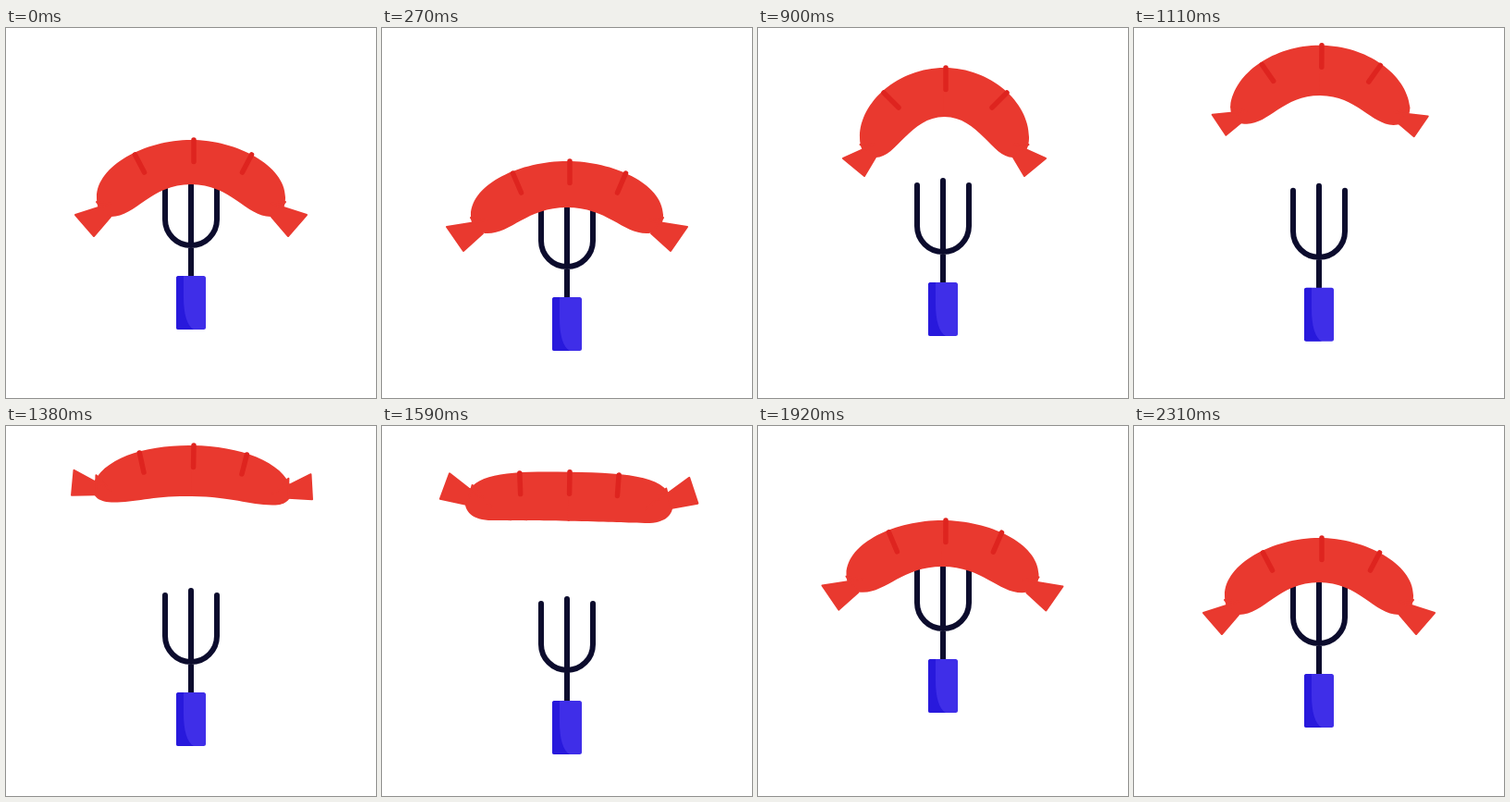
Animation of 400 by 400 pixels, one loop 4340 ms. Source, as an HTML page with a canvas:

```html
<!DOCTYPE html>
<html lang="en">
<head>
<meta charset="utf-8">
<title>Sausage toss</title>
<style>
html, body { margin: 0; height: 100%; overflow: hidden; background: #fff; }
canvas { display: block; }
</style>
</head>
<body>
<canvas id="stage" width="400" height="400"></canvas>
<script>
const ctx = document.getElementById('stage').getContext('2d');
const LOOP = 4340, STEP = 30, END = 2310;

// Half outlines measured from the top centre:
// top handle x, shoulder handle, shoulder, lobe, belly y,
// end piece (4 corners), side tick (2 points)
const rest = [50, 102, 28, 102, 62, 86, 83, 48,
  125, 81, 105, 104, 87, 83, 102, 67, 63, 16, 53, 35];
const wide = [50, 103, 24, 104, 58, 86, 78, 50,
  130, 71, 112, 97, 91, 78, 104, 61, 61, 13, 52, 34];
const bent = [50, 91.5, 37, 91.5, 75, 74, 97, 53,
  109.5, 98, 86.5, 117, 74, 96, 91, 83, 66.5, 27, 50.5, 43];
const flat = [50, 98, 15, 108, 46, 87, 63, 55,
  128, 29, 130, 56, 104, 55, 104, 34, 58, 9, 53, 30];
const straight = [80, 112, -2, 114, 28, 80, 51, 52,
  130, -4.5, 142, 23, 112, 31, 105, 10, 52, 0, 52, 23];

const poseKeys = [[0, rest], [270, wide], [570, rest], [630, rest], [900, bent],
  [1380, flat], [1740, straight], [1815, flat], [1920, wide], [END, rest]];
const forkKeys = [[0, 0], [570, 50], [600, 50], [750, 0], [900, 7], [1380, 20],
  [1620, 30], [1655, 31], [1740, 27], [1800, 6], [1920, -16], [END, 0]];
const topKeys = [[0, 121], [570, 171], [600, 171], [750, 121], [900, 43], [1080, 20],
  [1200, 17], [1380, 21], [1620, 56], [1740, 105], [1800, 118], [1920, 102], [END, 121]];
const midKeys = [[0, 200], [750, 200], [900, 201.5], [1380, 202], [1740, 203],
  [1920, 199.7], [END, 200]];
const tiltKeys = [[0, 0], [900, 0], [1380, 1], [1740, 1], [1920, 0.2], [END, 0]];

// Monotone cubic through the keys, at rest at every turning point
function ease(keys, t) {
  const last = keys.length - 1;
  if (t >= keys[last][0]) return keys[last][1];
  const rate = i => (keys[i + 1][1] - keys[i][1]) / (keys[i + 1][0] - keys[i][0]);
  const slope = i => {
    if (i === 0 || i === last) return 0;
    const a = rate(i - 1), b = rate(i);
    return a * b > 0 ? 2 * a * b / (a + b) : 0;
  };
  let i = 0;
  while (t >= keys[i + 1][0]) i++;
  const [t0, v0] = keys[i], [t1, v1] = keys[i + 1];
  const h = t1 - t0, u = (t - t0) / h, s = u * u * (3 - 2 * u);
  return v0 + (v1 - v0) * s
    + h * u * (1 - u) * ((1 - u) * slope(i) - u * slope(i + 1));
}

function drawFork(y) {
  ctx.save();
  ctx.translate(0, y);
  ctx.strokeStyle = '#0c0c2d';
  ctx.lineWidth = 6;
  ctx.stroke(new Path2D('M200 158V270M172 163V207A28 28 0 0 0 228 207V163'));
  ctx.beginPath();
  ctx.roundRect(184, 268, 32, 58, 2.5);
  ctx.fillStyle = '#3f2ee8';
  ctx.fill();
  ctx.clip();
  ctx.fillStyle = '#2819dc';
  ctx.fill(new Path2D('M184 268H192V290C192 310 196 322 203 326H184Z'));
  ctx.restore();
}

function drawHalf(p, side) {
  const [hx, kx, ky, sx, sy, bx, by, my, ...end] = p;
  ctx.save();
  ctx.scale(side, 1);
  ctx.beginPath();
  ctx.moveTo(-1, 0);
  ctx.lineTo(0, 0);
  ctx.bezierCurveTo(hx, 0, kx, ky, sx, sy);
  ctx.bezierCurveTo(sx, sy + (by - sy) * 0.55, bx + (sx - bx) * 0.75, by, bx, by);
  ctx.bezierCurveTo(bx * 0.7, by, bx * 0.5, my, 0, my);
  ctx.lineTo(-1, my);
  ctx.fill();
  ctx.beginPath();
  for (let i = 0; i < 8; i += 2) ctx.lineTo(end[i], end[i + 1]);
  ctx.lineTo(bx, (sy + by) / 2 - 4);
  ctx.closePath();
  ctx.fill();
  ctx.lineWidth = 2;
  ctx.stroke();
  ctx.restore();
}

function drawSausage(p, x, y, tilt) {
  ctx.save();
  ctx.translate(x, y);
  ctx.rotate(tilt * Math.PI / 180);
  ctx.fillStyle = ctx.strokeStyle = '#e9392f';
  drawHalf(p, -1);
  drawHalf(p, 1);
  ctx.translate(202.5 - x, 0);
  const [ax, ay, bx, by] = p.slice(16);
  ctx.beginPath();
  for (const side of [-1, 1]) {
    ctx.moveTo(side * ax, ay);
    ctx.lineTo(side * bx, by);
  }
  ctx.moveTo(0.5, 0);
  ctx.lineTo(0.5, 23.5);
  ctx.strokeStyle = '#de241f';
  ctx.lineWidth = 5.5;
  ctx.stroke();
  ctx.restore();
}

function draw(now) {
  const t = Math.floor(now % LOOP / STEP) * STEP;
  const pose = rest.map((_, i) => ease(poseKeys.map(([k, p]) => [k, p[i]]), t));
  ctx.fillStyle = '#fff';
  ctx.fillRect(0, 0, 400, 400);
  ctx.lineCap = ctx.lineJoin = 'round';
  drawFork(ease(forkKeys, t));
  drawSausage(pose, ease(midKeys, t), ease(topKeys, t), ease(tiltKeys, t));
}

const start = performance.now();
function tick() {
  draw(performance.now() - start);
  requestAnimationFrame(tick);
}
tick();
</script>
</body>
</html>
```
